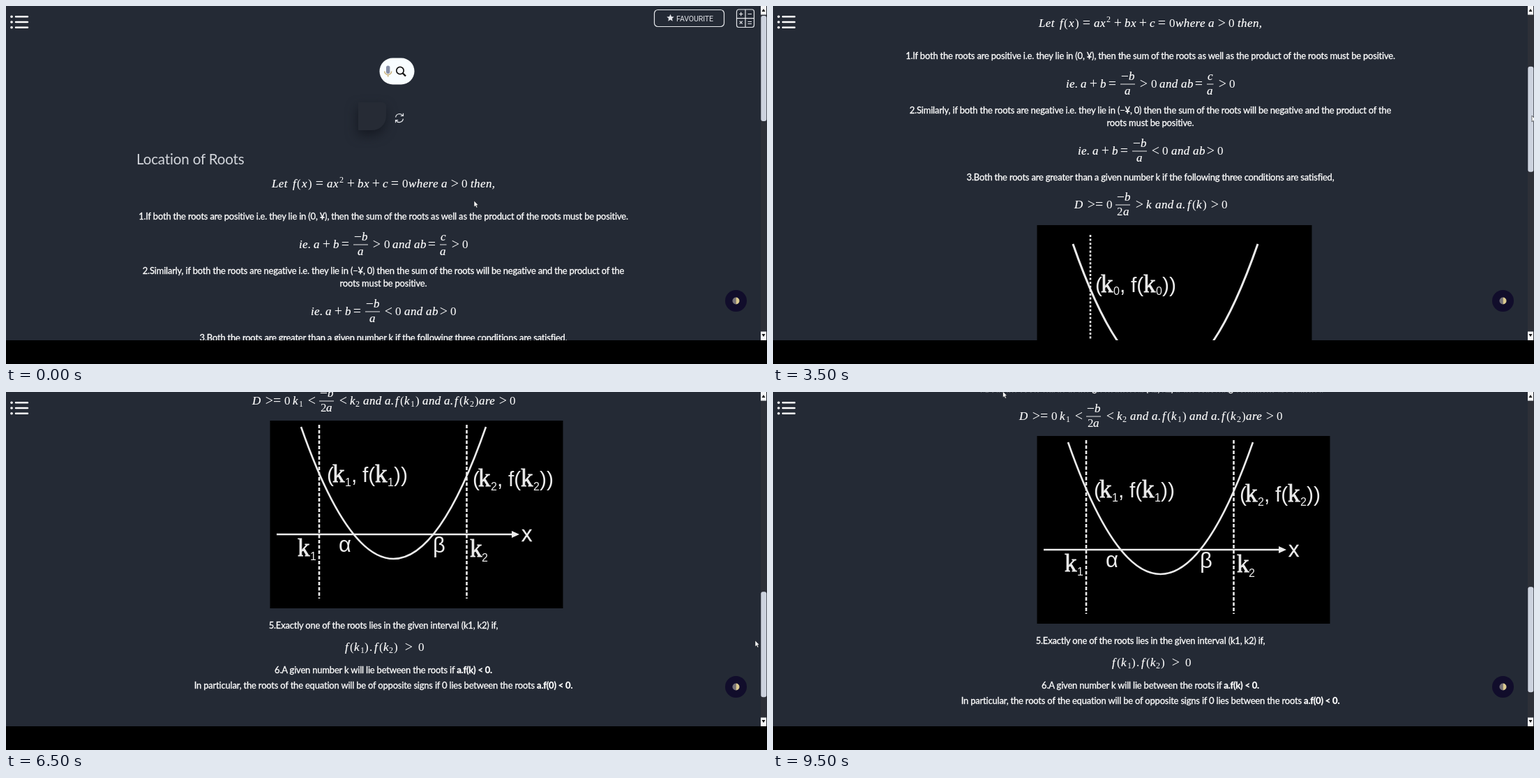
These frames come from a looping animation (1091x513 px, 10000 ms). An HTML page:

```html
<!DOCTYPE html>
<html lang="en">
<head>
<meta charset="utf-8">
<title>Location of Roots</title>
<style>
@property --s { syntax: "<number>"; inherits: true; initial-value: 0; }
@property --x { syntax: "<number>"; inherits: true; initial-value: 671; }
@property --y { syntax: "<number>"; inherits: true; initial-value: 279; }

html, body { margin: 0; width: 100%; height: 100%; overflow: hidden; background: #000; }
#stage { position: relative; width: 1091px; height: 513px; overflow: hidden; background: #000; animation: scroll 10s step-end infinite; }
svg { position: absolute; left: 0; top: 0; overflow: hidden; background: #242a35; }

.page { transform: translateY(calc(var(--s) * -1px)); }
.thumb { transform: translateY(calc(var(--s) * 0.3162px)); }
.cursor { transform: translate(calc(var(--x) * 1px), calc(var(--y) * 1px)); }

/* scroll offset and pointer position, held for half a second each */
@keyframes scroll {
  0% { --s: 0; --x: 671; --y: 279; }
  5% { --s: 0; --x: 760; --y: 240; }
  10% { --s: 0; --x: 1079; --y: 92; }
  15% { --s: 0; --x: 1081; --y: 84; }
  20% { --s: 32; --x: 1087; --y: 94; }
  25% { --s: 73; --x: 1092; --y: 107; }
  30% { --s: 140; --x: 1090; --y: 128; }
  35% { --s: 230; --x: 1088; --y: 157; }
  40% { --s: 335; --x: 1086; --y: 190; }
  45% { --s: 437; --x: 1085; --y: 222; }
  50% { --s: 600; --x: 1081; --y: 274; }
  55% { --s: 747; --x: 1077; --y: 319; }
  60% { --s: 784; --x: 1075; --y: 332; }
  65% { --s: 861; --x: 1074; --y: 356; }
  70% { --s: 851; --x: 1073; --y: 353; }
  75% { --s: 852; --x: 1072; --y: 353; }
  80% { --s: 843; --x: 1071; --y: 348; }
  85% { --s: 839; --x: 1050; --y: 420; }
  90% { --s: 839; --x: 424; --y: 14; }
  95%, 100% { --s: 839; --x: 329.5; --y: -1; }
}

text { fill: #fff; white-space: pre; }
.body text { font: 400 13px Lato, "Open Sans", sans-serif; letter-spacing: -.2px; text-anchor: middle; stroke: #fff; stroke-width: .3px; }
.body .b { font-weight: 700; }
.title { font: 400 20.6px Lato, "Open Sans", sans-serif; letter-spacing: -.17px; fill: #d3d6dc; }
.fav { font: 400 10.6px Roboto, sans-serif; letter-spacing: -.1px; fill: #e3e5ea; }

.math text { font: 17px "Liberation Serif", "Times New Roman", serif; }
.math .it { font-style: italic; letter-spacing: .4px; stroke: #fff; stroke-width: .2px; }
.math .op { font-size: 20px; transform: translate(.8px, 1.4px); }
.math .small { font-size: 12px; }
.math line { stroke: #fff; stroke-width: .9px; }

.graph { fill: none; stroke: #ececec; }
.graph text { fill: #ececec; stroke: none; font: 30px "Liberation Sans", Arial, sans-serif; }
.graph .k { font: 35px "Liberation Serif", "Times New Roman", serif; stroke: #ececec; stroke-width: .8px; }
.graph .sub { font-size: 16px; }
.graph .gr { font-size: 31px; }
.graph .ax { font-size: 23px; stroke: #ececec; stroke-width: .7px; }
.solid { fill: #ececec; stroke: none; }
.tile { fill: #262b35; filter: drop-shadow(-1px 7px 8px #151922); }
.line { fill: none; stroke: #e6e8ec; }
</style>
</head>
<body>
<div id="stage">
<svg width="1091" height="479" viewBox="0 0 1091 479">
  <g class="page">
    <g class="line" stroke-width="1.2">
      <rect x="929.5" y="5.5" width="100" height="24" rx="5"/>
      <rect x="1047.5" y="5" width="25" height="25.5" rx="3"/>
      <path d="M1060 5V30.500M1047.500 17.700H1072.500M1051 11.500h5.500M1053.700 8.700v5.600M1063.500 11.500h5.500M1051.700 21.700l4 4M1055.700 21.700l-4 4M1063.500 22.500h5.500M1063.500 25.500h5.500"/>
      <path d="M558.600 159.500a5.600 5.600 0 0 1 10.200-2.400M569.500 153.800v3.700h-3.700M569.400 161.700a5.600 5.600 0 0 1-10.200 2.400M558.500 167.300v-3.700h3.700"/>
    </g>
    <path fill="#e3e5ea" d="M952.500 11.700l1.500 3.500 3.700.3-2.800 2.500.9 3.700-3.300-2-3.300 2 .9-3.700-2.800-2.500 3.700-.3z"/>
    <text class="fav" x="961" y="21.500">FAVOURITE</text>

    <rect x="535.5" y="74.500" width="50" height="38" rx="19" fill="#f8fdff"/>
    <rect x="545" y="85.500" width="5.400" height="11.500" rx="2.700" fill="#858ea6"/>
    <path d="M542.700 93.500a5 5 0 0 0 10 0M547.700 98.500v3" fill="none" stroke="#c9b27c" stroke-width="1.500"/>
    <path d="M569 96.500l4 4" fill="none" stroke="#111" stroke-width="2.400"/>
    <circle cx="565" cy="92.500" r="5.200" fill="none" stroke="#111" stroke-width="1.700"/>

    <path class="tile" d="M505 138H540a5 5 0 0 1 5 5V158a20 20 0 0 1-20 20H505z"/>

    <text class="title" x="187" y="227">Location of Roots</text>
    <g class="body">
      <text x="541" y="306">1.If both the roots are positive i.e. they lie in (0, ¥), then the sum of the roots as well as the product of the roots must be positive.</text>
      <text x="541" y="383.500">2.Similarly, if both the roots are negative i.e. they lie in (−¥, 0) then the sum of the roots will be negative and the product of the</text>
      <text x="541" y="402">roots must be positive.</text>
      <text x="541" y="480">3.Both the roots are greater than a given number k if the following three conditions are satisfied,</text>
      <text x="541" y="838.500">4.Both the roots will lie in the given interval (k1, k2) if the following conditions are satisfied</text>
      <text x="541" y="1200">5.Exactly one of the roots lies in the given interval (k1, k2) if,</text>
      <text x="541" y="1264">6.A given number k will lie between the roots if <tspan class="b">a.f(k) &lt; 0.</tspan></text>
      <text x="541" y="1285.500">In particular, the roots of the equation will be of opposite signs if 0 lies between the roots <tspan class="b">a.f(0) &lt; 0.</tspan></text>
    </g>
    <g class="math" id="math"></g>

    <g class="graph" id="first" transform="translate(0 437)">
      <rect x="378.500" y="107" width="394" height="266" fill="#000" stroke="none"/>
      <path d="M455 121V353" stroke-width="2.600" stroke-dasharray="3 2.600"/>
      <path d="M430 134Q562.500 514 695 134" stroke-width="3"/>
      <path d="M394 289H733" stroke-width="5"/>
      <path class="solid" d="M731 283l12 6-12 6z"/>
    </g>
    <g class="graph" id="second" transform="translate(0 747)">
      <rect x="378.500" y="155" width="420" height="269" fill="#000" stroke="none"/>
      <path d="M449 161V410M660.500 161V410" stroke-width="2.600" stroke-dasharray="5 2.500"/>
      <path d="M423 164Q555.500 542 688 164" stroke-width="2.600"/>
      <path d="M388 318H727" stroke-width="2.600"/>
      <path class="solid" d="M725 313l11 5-11 5z"/>
    </g>
  </g>

  <g stroke="#fff" stroke-width="2.500" stroke-linecap="round">
    <path d="M14 15.300H31M14 23H31M14 30.700H31"/>
    <path d="M8 15.300h.1M8 23h.1M8 30.700h.1" stroke-width="3.600"/>
  </g>

  <circle cx="1046.500" cy="422.500" r="15.500" fill="#110d2b"/>
  <path d="M1046.500 417.500a5 5 0 0 0 0 10z" fill="#77737a"/>
  <path d="M1046.500 417.500a5 5 0 0 1 0 10z" fill="#dccb92"/>

  <rect x="1082" y="0" width="9" height="479" fill="#2d3038"/>
  <path d="M1082 0h8v12.500h-8zM1082 466.500h8v12.500h-8z" fill="#f4f5f7"/>
  <path d="M1083.500 8l2.500-4 2.500 4zM1083.500 470l2.500 4 2.500-4z" fill="#111"/>
  <rect class="thumb" x="1082.300" y="14" width="8" height="151" rx="3" fill="#cdd3df"/>

  <path class="cursor" d="M0 0V9L2 7.200 3.500 10.300 5 9.600 3.600 6.600H6.200z" fill="#fff" stroke="#15181e" stroke-width=".6"/>
</svg>
</div>
<script>
const NS = "http://www.w3.org/2000/svg";

function add(parent, name, attrs, text = "") {
  const el = document.createElementNS(NS, name);
  for (const key in attrs) el.setAttribute(key, attrs[key]);
  el.textContent = text;
  parent.append(el);
}

// Tokens are text@x or text@x@role; "|@x@width" is a fraction bar.
const roles = { n: -11, d: 10, s: 3, p: -7 };
function formula(y, tokens) {
  const box = document.getElementById("math");
  for (const token of tokens.split(" ")) {
    const [text, x, role] = token.split("@");
    if (text === "|") {
      add(box, "line", { x1: x, x2: +x + +role, y1: y - 5, y2: y - 5 });
      continue;
    }
    const kind = /[a-z]/i.test(text) ? "it" : /[=<>+−]/.test(text) ? "op" : "";
    const small = role === "s" || role === "p" ? " small" : "";
    add(box, "text", { x, y: y + (roles[role] || 0), class: kind + small }, text);
  }
}

formula(259.5, "Let@381 f@411 (@417 x@424 )@433 =@443 ax@460 2@478@p +@488 bx@504 +@524 c@540 =@551 0@568 where@577 a@624 >@637 0@653 then,@666");
formula(347, "ie.@420 a@441 +@453 b@469 =@480 |@498@21 −@498@n b@510@n a@504@d >@525 0@542 and@554 ab@585 =@604 |@622@9.500 c@623@n a@622@d >@638 0@654");
formula(443, "ie.@437 a@458 +@470 b@486 =@497 |@515@21 −@515@n b@527@n a@521@d <@542 0@558 and@571 ab@602 >@621 0@637");
formula(520, "D@432 >=@450 0@478 |@491@21 −@492@n b@504@n 2@493@d a@502@d >@519 k@535 and@548 a.@578 f@594 (@601 k@607 )@616 >@627 0@643");
formula(879, "D@353 >=@371 0@399 k@411 1@420@s <@432 |@449@21 −@449@n b@461@n 2@451@d a@459@d <@477 k@493 2@501@s and@512 a.@543 f@558 (@565 k@571 1@580@s )@587 and@597 a.@628 f@643 (@650 k@656 2@665@s )@672 are@678 >@706 0@722");
formula(1232, "f@486 (@493 k@499 1@508@s )@514 .@521 f@528 (@535 k@541 2@549@s )@556 >@571 0@591");

// Graph labels, as "text@x@baseline@class".
function labels(id, tokens) {
  for (const token of tokens.split(" ")) {
    const [text, x, y, kind = ""] = token.split("@");
    add(document.getElementById(id), "text", { x, y, class: kind }, text);
  }
}

// A point label such as (k1, f(k1)).
function point(id, x, y, sub, drop) {
  labels(id, `(@${x}@${y} k@${x + 8}@${y}@k ${sub}@${x + 26}@${y + drop}@sub ,@${x + 35}@${y} f(@${x + 51}@${y} k@${x + 69}@${y}@k ${sub}@${x + 87}@${y + drop}@sub ))@${x + 96}@${y}`);
}

point("first", 462, 203, 0, 4);
labels("first", "k@416@320@k 0@432@324@sub α@487@311@gr β@616@314@gr X@745@303@ax");
point("second", 460, 243, 1, 6);
point("second", 669, 249, 2, 6);
labels("second", "k@418@349@k 1@436@355@sub k@665@350@k 2@682@357@sub α@477@343@gr β@612@344@gr X@739@328@ax");
</script>
</body>
</html>
```
